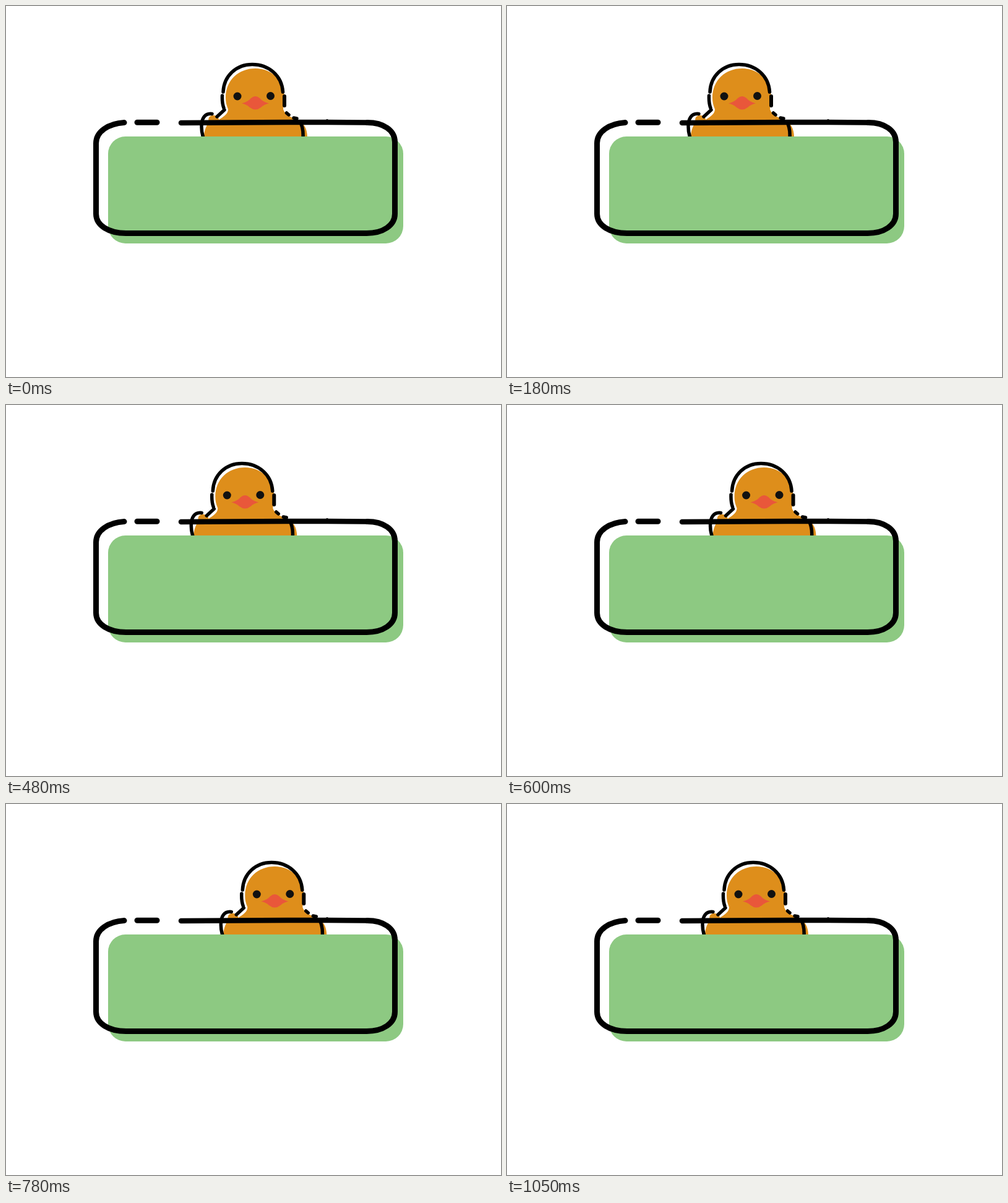
These frames come from a looping animation (800 by 600 pixels, 1.08 s). An HTML page:

```html
<!DOCTYPE html>
<html lang="en">
<head>
<meta charset="utf-8">
<title>Duckling</title>
<style>
html, body { margin: 0; width: 100%; height: 100%; overflow: hidden; background: #fff; }
svg { display: block; width: 800px; height: 600px; }
.line { fill: none; stroke: #000; stroke-linecap: round; stroke-linejoin: round; }
</style>
</head>
<body>
<svg viewBox="0 0 800 600">
  <clipPath id="above"><rect width="800" height="211"/></clipPath>
  <g clip-path="url(#above)">
    <g id="duck">
      <path fill="#de8e1b" d="M320 213C320 201 324 193 328 188C325 180 331 176 337 177C342 178 344 181 344 184
        C352 179 359 174 359 167C356 160 355 155 355 148C355 120 376 101 403 101C430 101 450 121 450 148
        C450 156 448 162 448 167C451 177 464 181 473 185C482 190 487 199 487 213Z"/>
      <circle cx="374" cy="146" r="6.5" fill="#111"/>
      <circle cx="427.500" cy="145.500" r="6.5" fill="#111"/>
      <path fill="#e9573a" d="M381 157.500Q391 155 396 149Q403 143 410 149Q415 155 425 157.500Q417 159 412 164Q403 171 394 164Q389 159 381 157.500Z"/>
      <path class="line" stroke-width="5.500" d="M351 139C352 113 372 94.500 398 94.500C425 94.500 446 113 447.500 139
        M349.500 145Q349 157 352 165M353 168L341 179M333 174.500C321 173 316 182 316 195Q316 205 319 213
        M453.500 173L457 176M465 181L470 182M475 187Q481 197 480 213"/>
      <path class="line" stroke-width="6" d="M450 146V161"/>
    </g>
  </g>
  <rect x="165" y="211" width="477" height="173" rx="28" fill="#8dc982"/>
  <path class="line" stroke-width="9" d="M191 188.500C166 190 145.500 203 145.500 222V336C145.500 355 166 367.500 194 367.500
    H583C609 367.500 628.500 355 628.500 336V220C628.500 201 610 188.500 584 188.500M212 188.300H244"/>
  <path class="line" stroke-width="8.500" d="M283 189L455 188H520L584 188.500"/>
  <circle cx="519" cy="185" r="2"/>
</svg>
<script>
const LOOP = 1080, STEP = 30;
// Sideways sway as [time, offset] points joined by straight runs
const sway = [[0, 0], [360, -46], [710, 39.4], [1050, 0]];
const duck = document.getElementById('duck');

function offsetAt(t) {
  const i = Math.max(1, sway.findIndex(p => p[0] >= t));
  const [t0, x0] = sway[i - 1], [t1, x1] = sway[i];
  return x0 + (x1 - x0) * (t - t0) / (t1 - t0);
}

const start = performance.now();
function draw() {
  const t = (performance.now() - start) % LOOP;
  duck.setAttribute('transform', `translate(${offsetAt(Math.floor(t / STEP) * STEP)} 0)`);
  requestAnimationFrame(draw);
}
draw();
</script>
</body>
</html>
```
